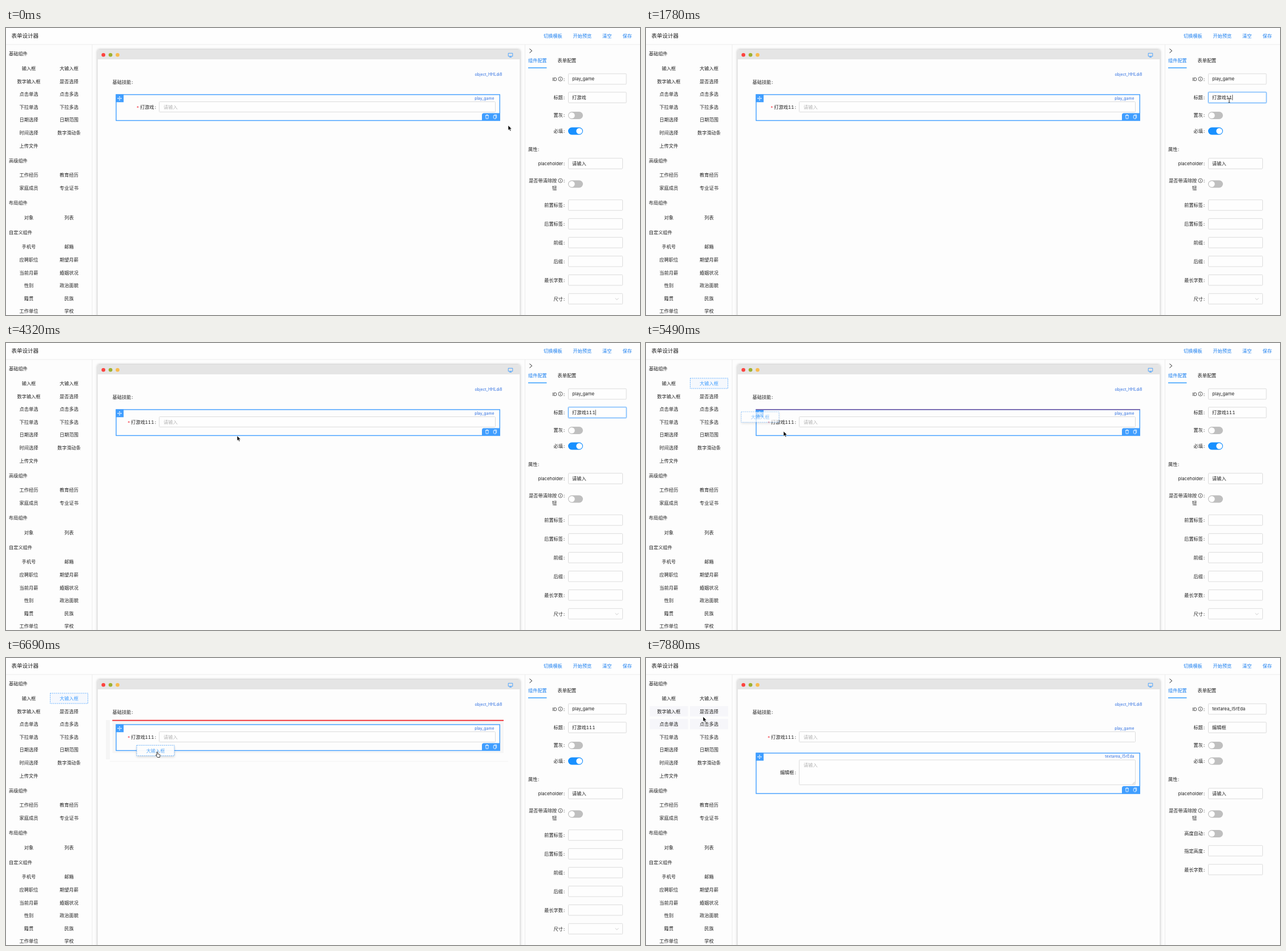
An HTML page that plays this animation: 1111 by 504 pixels, repeating every 8 s.

```html
<!DOCTYPE html>
<html lang="zh-CN">
<head>
<meta charset="utf-8">
<title>表单设计器</title>
<style>
  html, body { margin: 0; width: 100%; height: 100%; overflow: hidden; background: #fdfdfd; }
  svg { display: block; width: 1111px; height: 504px; }
  text { font-family: Inter, "Noto Sans CJK SC", "Noto Sans CJK", sans-serif; font-variant-numeric: tabular-nums; white-space: pre; }
  .window { filter: drop-shadow(0 0 2px rgba(0, 0, 0, .32)); }
  .ghost { filter: drop-shadow(0 2px 2px rgba(0, 0, 0, .16)); }
</style>
</head>
<body>
<svg id="stage" viewBox="0 0 1111 504" lang="zh-CN"></svg>
<script>
const stage = document.getElementById('stage');
const LOOP = 8000, TICK = 148.6;
const INK = '#222', LINK = '#1a7ff0', BLUE = '#409eff', LINE = '#d9d9d9', HINT = '#b4b4b4';
const SIZE = 8.2, LATIN = 7.8, SMALL = 6.9, DIGIT = 5.3;

const text = (x, y, s, { size = SIZE, fill = INK, anchor = 'start', weight = 400 } = {}) =>
  `<text x="${x}" y="${y + size * 0.37}" font-size="${size}" fill="${fill}" text-anchor="${anchor}" font-weight="${weight}">${s}</text>`;
const rect = (x, y, w, h, fill, extra = '') =>
  `<rect x="${x}" y="${y}" width="${w}" height="${h}" fill="${fill}" ${extra}/>`;
const path = (d, stroke, width = 1, fill = 'none') =>
  `<path d="${d}" fill="${fill}" stroke="${stroke}" stroke-width="${width}" stroke-linejoin="round"/>`;
const circle = (x, y, r, fill, extra = '') => `<circle cx="${x}" cy="${y}" r="${r}" fill="${fill}" ${extra}/>`;
const at = (x, y, body) => `<g transform="translate(${x} ${y})">${body}</g>`;

// Position along [tick, x, y] keys
function along(keys, tick) {
  let i = keys.findIndex(k => k[0] > tick);
  if (i < 0) return keys[keys.length - 1].slice(1);
  if (i === 0) return keys[0].slice(1);
  const [t0, x0, y0] = keys[i - 1], [t1, x1, y1] = keys[i];
  const p = (tick - t0) / (t1 - t0);
  return [x0 + (x1 - x0) * p, y0 + (y1 - y0) * p];
}

const POINTER = [
  [0, 880, 171], [2, 905, 152], [5, 1018, 129], [7, 1022, 127], [21, 1022, 127],
  [24, 1016, 215], [28, 1000, 332], [29, 405, 163], [31, 128, 82], [34, 112, 73],
  [36, 175, 92], [37, 241, 155], [38, 262, 165], [39, 266, 167], [42, 266, 165],
  [46, 266, 165], [48, 226, 150], [52, 99, 104], [53, 100, 103]
];
const GHOST = [[34, 110, 71], [36, 166, 84], [37, 200, 130], [38, 245, 160], [39, 262, 165], [42, 262, 162.5]];

const PALETTE = [
  ['基础组件', 45, '输入框 大输入框 数字输入框 是否选择 点击单选 点击多选 下拉单选 下拉多选 日期选择 日期范围 时间选择 数字滑动条 上传文件'],
  ['高级组件', 232.5, '工作经历 教育经历 家庭成员 专业证书'],
  ['布局组件', 307, '对象 列表'],
  ['自定义组件', 358.5, '手机号 邮箱 应聘职位 期望月薪 当前月薪 婚姻状况 性别 政治面貌 籍贯 民族 工作单位 学校']
];

function header() {
  const links = [[942, '切换模板'], [993.5, '开始预览'], [1045, '清空'], [1080.5, '保存']];
  return rect(0, 0, 1111, 28.5, '#fefefe') + rect(0, 28.5, 1111, 1, '#ededed') +
    text(9.5, 13, '表单设计器', { size: 9.5, weight: 500 }) +
    links.map(([x, s]) => text(x, 14, s, { fill: LINK })).join('');
}

function palette(tick) {
  const dragging = tick >= 34 && tick < 46;
  const hovered = tick >= 53 ? ['数字输入框', '是否选择', '点击单选', '点击多选']
    : tick >= 51 ? ['是否选择', '点击单选', '点击多选']
    : tick >= 31 && tick < 34 ? ['大输入框'] : [];
  let out = rect(150.5, 29, 1, 475, '#ebebeb');
  for (const [title, top, names] of PALETTE) {
    out += text(5, top, title, { weight: 500 });
    names.split(' ').forEach((name, i) => {
      const x = i % 2 ? 110.5 : 40, y = top + 25.9 + (i >> 1) * 22.6;
      const picked = dragging && name === '大输入框';
      if (picked) out += rect(x - 33, y - 9, 66, 18, '#f5f8fd', `stroke="${BLUE}" stroke-width=".8" stroke-dasharray="2 1.4"`);
      else if (hovered.includes(name)) out += rect(x - 33.5, y - 9, 67, 18, '#f6f6fa');
      out += text(x, y, name, { anchor: 'middle', fill: picked || (hovered.includes(name) && tick < 34) ? BLUE : INK });
    });
  }
  return out;
}

function windowFrame() {
  const lights = ['#fc4440', '#a0b02f', '#f8bb4e'];
  return `<g class="window">${rect(160.5, 38, 740, 480, '#fdfdfd', 'rx="3"')}</g>` +
    path('M160.5 55V41q0-3 3-3H897.500q3 0 3 3V55z', 'none', 0, '#e5e5e5') +
    lights.map((c, i) => circle(170.7 + i * 12.4, 47.3, 3.3, c)).join('') +
    path('M880.2 44.3h7.600v5.400h-7.600zM884 49.700v1.600M881.800 51.200h4.400', BLUE, 0.9);
}

function fieldLabel(s, y, required, width) {
  return text(259.5, y, s, { anchor: 'end' }) + text(260.7, y, ':') +
    (required ? text(259.5 - width - 6.6, y + 1, '*', { fill: '#f5333f' }) : '');
}

function selection(top, bottom) {
  const trash = 'M-3-2.500h6M-1.200-2.500v-1h2.400v1M-2.300-2.500l.4 5.800h3.800l.4-5.800';
  const copy = 'M-1.600-3.400h4.300v5.600M-2.700-2.300h4v5.600h-2.800l-1.200-1.200z';
  const move = 'M-3.500 0h7M0-3.500v7M-2.500-1l-1 1 1 1M2.500-1l1 1-1 1M-1-2.500l1-1 1 1M-1 2.500l1 1 1-1';
  return rect(193, top, 672.3, bottom - top, 'none', `stroke="${BLUE}" stroke-width="1.4"`) +
    rect(192.5, top - 0.5, 13.600, 13.8, BLUE) + at(199, top + 6.600, path(move, '#fff', 0.8)) +
    path(`M834 ${bottom + .5}v-10q0-3.500 3.500-3.500h28.300v13.500z`, 'none', 0, BLUE) +
    at(843, bottom - 6.5, path(trash, '#fff', 0.8)) + at(857, bottom - 6.5, path(copy, '#fff', 0.8));
}

function canvas(tick, ones) {
  const added = tick >= 46;
  const id = (x, y, s) => text(x, y, s, { size: SMALL, fill: '#2f6fe0', anchor: 'end' });
  const box = (y, h) => rect(268.5, y, 589, h, '#fefefe', `stroke="${LINE}" stroke-width=".9" rx="1"`);
  let out = windowFrame();
  if (tick >= 39 && tick < 46) out += rect(175, 109, 7, 69, '#f5f5f5');
  if (tick >= 41 && tick < 46) {
    out += rect(186.5, 110, 685.5, 57, '#f6f6f6') + rect(193, 117, 672, 46, '#fdfdfd') + rect(182, 181, 698, 1, '#f4f4f4');
  }
  out += id(869.5, 81.5, 'object_HHLdi8') +
    text(186.5, 95, '基础技能', { weight: 500 }) + text(220.3, 95, ':') +
    box(129.5, 18) + text(276, 139, '请输入', { fill: HINT }) +
    fieldLabel('打游戏' + '1'.repeat(ones), 139, true, 24.6 + DIGIT * ones) +
    id(855.5, 123, 'play_game');
  if (added) {
    out += box(179, 43.7) + text(276, 188, '请输入', { fill: HINT }) + fieldLabel('编辑框', 201, false) +
      path('M852.5 221.700l4-4M854.800 221.700l1.700-1.700', '#999', 0.6) +
      id(855.5, 172, 'textarea_I5rEda') + selection(167, 238);
  } else {
    out += selection(117, 162.5);
  }
  if (tick === 37) out += rect(192.5, 116, 673.5, 1.800, '#7c68ad');
  if (tick >= 38 && tick < 41) out += rect(181.5, 74.5, 697.5, 1.8, '#f0281f');
  if (tick >= 41 && tick < 46) out += rect(186.3, 108.700, 685.7, 1.8, '#ee2328');
  return out;
}

const input = (y, w = 95, focused = false) =>
  (focused ? rect(984.9, y - 9.700, w + 1.2, 19.8, 'none', 'stroke="#cfe6ff" stroke-width="1.600" rx="1.5"') : '') +
  rect(985.5, y - 9.2, w, 18.500, '#fefefe', `stroke="${focused ? '#4ba3fb' : LINE}" stroke-width=".9" rx="1"`);
const toggle = (y, on) => rect(985, y - 6.5, 26, 13, on ? '#1890ff' : '#bfbfbf', 'rx="6.500"') + circle(on ? 1004.6 : 991.4, y, 5.3, '#fff');
const rowLabel = (y, s, end = 976) => text(end, y, s, { anchor: 'end', size: /[a-z]/.test(s) ? LATIN : SIZE }) + text(977, y, ':');
const info = y => circle(971.5, y, 3.6, 'none', `stroke="${INK}" stroke-width=".7"`) + path(`M971.5 ${y - .6}v2.500M971.5 ${y - 2}v.8`, INK, 0.8);
const fields = added => added
  ? [['指定高度', 338.5], ['最长字数', 371.500]]
  : ['前置标签', '后置标签', '前缀', '后缀', '最长字数', '尺寸'].map((s, i) => [s, 311 + i * 32.9]);

function caretShown(tick) {
  return (tick >= 5 && tick < 10) || (tick >= 12 && tick < 19) || (tick >= 22 && tick < 26) || (tick >= 29 && tick < 34);
}

function settings(tick, ones) {
  const added = tick >= 46, focused = tick >= 5 && tick < 34;
  let out = rect(909, 29, 1, 475, '#ebebeb') + path('M917.500 36.500l4.200 3.600-4.200 3.600', INK, 1) +
    text(915, 57, '组件配置', { fill: LINK, weight: 500 }) + text(966.5, 57, '表单配置') +
    rect(915, 69.3, 32.5, 1.300, '#1890ff');
  out += rowLabel(89.5, 'ID', 965.5) + info(89.5) + input(89.5, 101.5) +
    text(992.3, 89.3, added ? 'textarea_I5rEda' : 'play_game', { size: LATIN });
  out += rowLabel(122, '标题') + input(122, 101.5, focused) + text(992, 122, added ? '编辑框' : '打游戏' + '1'.repeat(ones));
  if (focused && caretShown(tick)) out += rect(1016.8 + DIGIT * ones, 117.3, 0.8, 9.5, INK);
  out += rowLabel(153, '置灰') + toggle(153.5, false) + rowLabel(181, '必填') + toggle(181, !added) +
    text(915, 212.5, '属性', { weight: 500 }) + text(932, 212.5, ':') +
    rowLabel(238, 'placeholder') + input(238) + text(992, 238, '请输入') +
    rowLabel(268, '是否带清除按', 965.3) + info(268) + text(965.3, 281, '钮', { anchor: 'end' }) + toggle(274, false);
  if (added) out += rowLabel(308, '高度自动') + toggle(308.5, false);
  for (const [name, y] of fields(added)) out += rowLabel(y, name) + input(y);
  if (!added) out += path('M1067.700 474.500l2.800 2.800 2.800-2.800', '#bdbdbd', 0.8);
  return out;
}

function ghost(tick) {
  if (tick < 35 || tick >= 46) return '';
  const [x, y] = along(GHOST, tick);
  return `<g class="ghost" opacity="${tick < 38 ? 0.65 : 0.95}">` +
    at(x, y, rect(-33, -9.2, 66, 18.4, '#fdfdfd', `stroke="${BLUE}" stroke-width=".8" stroke-dasharray="2 1.400"`) +
      text(0, 0, '大输入框', { anchor: 'middle', fill: '#55a6f8' })) + '</g>';
}

function pointer(tick) {
  const [x, y] = along(POINTER, tick);
  const overInput = x > 986 && x < 1080 && [89.5, 122, 238, ...fields(false).map(f => f[1])].some(c => Math.abs(c - y) < 9);
  const hand = tick === 45 || (tick >= 31 && tick < 35);
  if (overInput) return at(x, y, path('M-1.500-4q1.500 0 1.500 1v6q0 1-1.500 1M1.500-4q-1.500 0-1.500 1M0 3q0 1 1.500 1', INK, 0.9));
  if (hand) return at(x, y, path('M-1.700 1q0-1.200.9-1.200t.9 1.200v2.600l2.900.7q1.300.4 1 1.700l-.6 3.500h-4l-2.700-3.700q-.3-1 .7-.8l.9.8z', '#111', 0.8, '#fff'));
  return at(x, y, path('M0 0v8.700l2-1.900 1.400 3.100 1.500-.7-1.400-3h2.700z', '#fff', 0.6, '#000'));
}

function scene(tick) {
  const ones = [7, 12, 15].filter(t => tick >= t).length;
  return rect(0, 0, 1111, 504, '#fdfdfd') + header() + palette(tick) + canvas(tick, ones) +
    settings(tick, ones) + ghost(tick) + pointer(tick);
}

let shown = -1;
const start = performance.now();
function draw() {
  const t = (performance.now() - start) % LOOP;
  const tick = Math.min(53, Math.floor((t + 12) / TICK));
  if (tick !== shown) stage.innerHTML = scene(shown = tick);
  requestAnimationFrame(draw);
}
draw();
</script>
</body>
</html>
```
